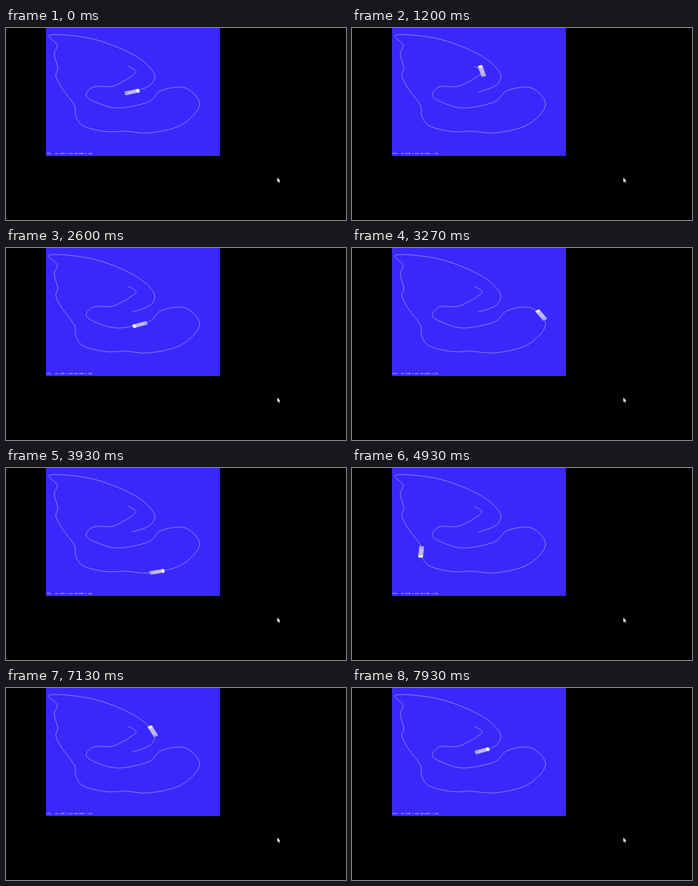
Write an HTML page that moves like this. It is 426 by 240 pixels and loops after 8000 ms.

```html
<!DOCTYPE html>
<html lang="en">
<head>
<meta charset="utf-8">
<title>Car on a spline track</title>
<style>
html, body { margin: 0; width: 100%; height: 100%; overflow: hidden; background: #000; }
svg { display: block; width: 426px; height: 240px; }
text { font: 2.9px "Liberation Mono", "DejaVu Sans Mono", monospace; fill: #e4e0ff; white-space: pre; }
</style>
</head>
<body>
<svg viewBox="0 0 426 240">
  <defs><clipPath id="view"><rect x="50" width="218" height="160"/></clipPath></defs>
  <rect width="426" height="240" fill="#000"/>
  <g clip-path="url(#view)">
    <rect x="50" width="218" height="160" fill="#3928fb"/>
    <path id="track" fill="none" stroke="#9488f6" stroke-width=".8"/>
    <path id="route" fill="none"/>
    <g id="car">
      <rect x="-7.2" y="-2.4" width="14.4" height="4.8" rx="1" fill="#aca5f1"/>
      <rect x="-4" y="-1.4" width="8" height="2.8" fill="#c3bdf5"/>
      <rect x="-7.2" y="-2" width="2.8" height="4" rx=".8" fill="#fff"/>
    </g>
    <text id="hud" x="51" y="158.3"></text>
  </g>
  <path d="M340 187v5.6l1.3-1 .9 1.8 .9-.4-.9-1.8h1.6z" fill="#fff"/>
</svg>
<script>
const LOOP = 8000, FRAME = 1000 / 15, STRETCH = 1.3;
const $ = id => document.getElementById(id);
const track = $('track'), route = $('route'), car = $('car'), hud = $('hud');

const pts = [
  [153, 48], [163, 55], [148, 66], [132, 73], [110, 73.5], [100.5, 84], [112, 92.5],
  [140, 100], [178, 92.5], [195, 78], [225, 75], [242.5, 96], [220, 121], [180, 131],
  [150, 129], [126, 129.5], [97, 122.5], [87, 109], [86, 97], [70, 75], [62.5, 60],
  [65, 50], [60.5, 33], [64, 21], [53.5, 9.5], [75, 8.8], [110, 14], [142, 25],
  [170, 40], [186, 58], [180, 72], [158, 80]
];

// Catmull-Rom curve through p
function spline(p) {
  let d = `M${p[0]}`;
  for (let i = 0; i < p.length - 1; i++) {
    const a = p[i - 1] || p[i], b = p[i], c = p[i + 1], e = p[i + 2] || c;
    const h1 = b.map((v, k) => v + (c[k] - a[k]) / 6);
    const h2 = c.map((v, k) => v - (e[k] - b[k]) / 6);
    d += `C${h1} ${h2} ${c}`;
  }
  return d;
}

const line = spline(pts);
track.setAttribute('d', line);
// The car also drives the undrawn stretch that closes the lap.
route.setAttribute('d', line + 'C142 84 138 42 153 48');
const lap = route.getTotalLength(), drawn = track.getTotalLength();
const at = d => route.getPointAtLength(((d % lap) + lap) % lap);

function nearest(x, y) {
  let best = 0, min = Infinity;
  for (let d = 0; d < drawn; d += 0.5) {
    const p = at(d), r = Math.hypot(p.x - x, p.y - y);
    if (r < min) { min = r; best = d; }
  }
  return best;
}

// Waypoints: time, x, y
const stops = [
  [1200, 162.5, 54], [2600, 168, 96], [3930, 189.5, 129],
  [5930, 57.5, 8.5], [7130, 184.5, 53], [7930, 163.3, 78.5]
].map(([t, x, y]) => [t, nearest(x, y)]);
const shift = ([t, d], n) => [t + n * LOOP, d + n * lap];
const keys = [
  shift(stops[5], -1), [0, drawn - lap], ...stops, [LOOP, drawn], shift(stops[0], 1)
];

const slope = i =>
  (keys[i + 1][1] - keys[i - 1][1]) / (keys[i + 1][0] - keys[i - 1][0]);

function distance(t) {
  const i = keys.findIndex(k => k[0] > t) - 1;
  const [t0, d0] = keys[i], [t1, d1] = keys[i + 1], h = t1 - t0;
  const u = (t - t0) / h, v = 1 - u;
  return d0 * v * v * (1 + 2 * u) + d1 * u * u * (3 - 2 * u)
    + h * u * v * (slope(i) * v - slope(i + 1) * u);
}

function draw(t) {
  const d = distance(t), p = at(d), a = at(d - 2.5), b = at(d + 2.5);
  const turn = Math.atan2(b.y - a.y, (b.x - a.x) / STRETCH) * 180 / Math.PI;
  car.setAttribute('transform',
    `translate(${p.x} ${p.y}) scale(${STRETCH} 1) rotate(${turn})`);
  const clock = (t / 1000).toFixed(3);
  hud.textContent = `FPS:  30 TIME ${clock} DAYTIME ${clock}`;
}

function tick() {
  const t = performance.now() % LOOP;
  draw(Math.floor(t / FRAME + 0.05) * FRAME % LOOP);
  requestAnimationFrame(tick);
}
tick();
</script>
</body>
</html>
```
